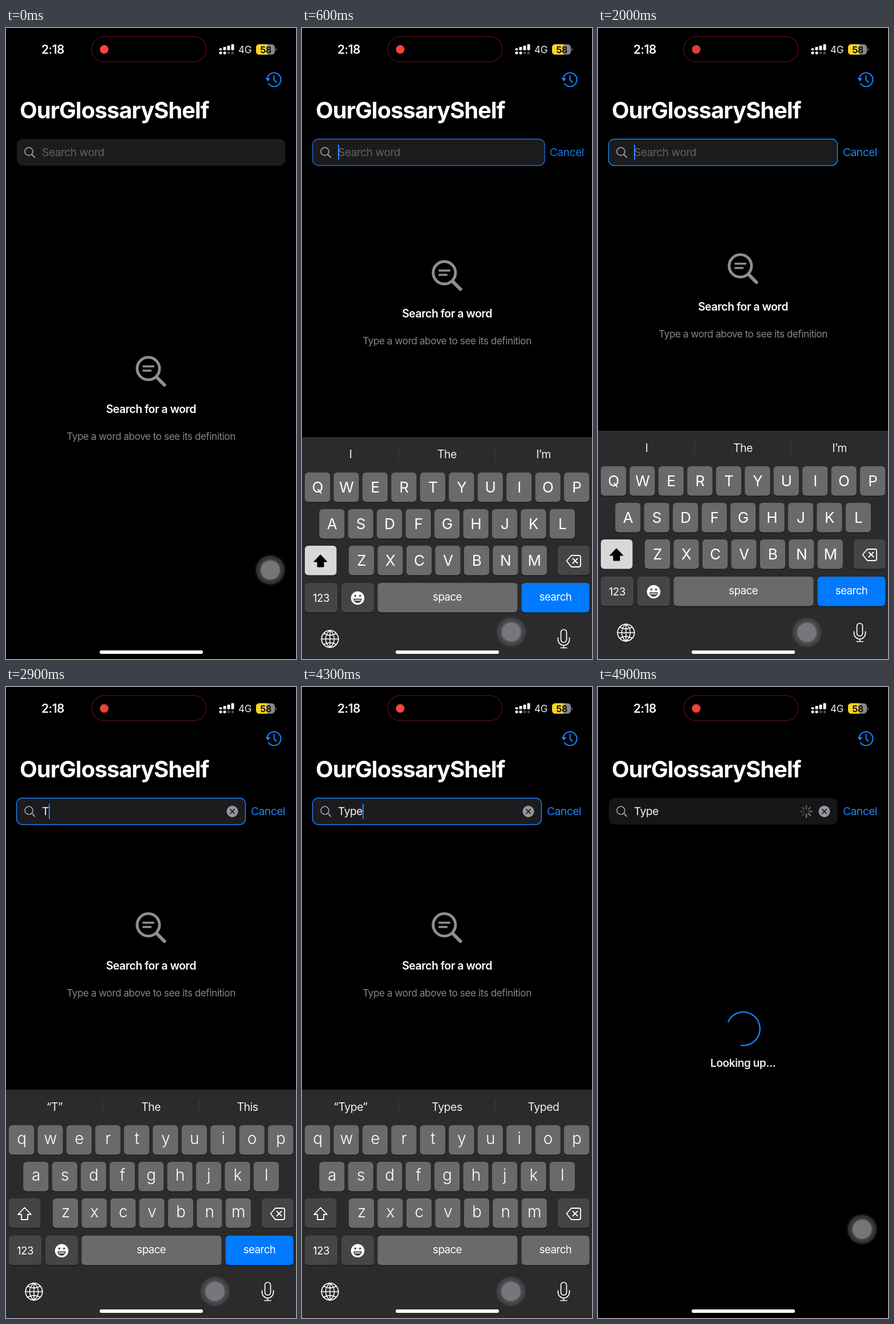
Write an HTML page with a canvas that moves like this. It is 508 px wide and 1103 px high and loops after 5 s.

```html
<!DOCTYPE html>
<html lang="en">
<head>
<meta charset="utf-8">
<title>Dictionary search</title>
<style>
  html, body { margin: 0; width: 100%; height: 100%; overflow: hidden; background: #000; }
  canvas { display: block; width: 508px; height: 1103px; }
</style>
</head>
<body>
<canvas id="stage" width="508" height="1103"></canvas>
<script>
const ctx = document.getElementById('stage').getContext('2d');
const LOOP = 5000, TAU = Math.PI * 2;
const BLUE = '#1a84ff', KEY = '#6a696c', DARK_KEY = '#454447', GREY = '#8e8e93';
const SUBMIT = 4380;

// Each key tap: when it is pressed, when its letter lands, when its popup goes
const TAPS = [
  { key: 't', down: 2500, typed: 2600, up: 2680 },
  { key: 'y', down: 3260, typed: 3380, up: 3440 },
  { key: 'p', down: 3450, typed: 3560, up: 3620 },
  { key: 'e', down: 3820, typed: 3900, up: 3980 }
];
const WORDS = ['', 'T', 'Ty', 'Typ', 'Type'];
const HINTS = [
  ['I', 'The', 'I’m'],
  ['“T”', 'The', 'This'],
  ['“Ty”', 'Type', 'Types'],
  ['“Typ”', 'Type', 'Types'],
  ['“Type”', 'Types', 'Typed']
];
const ROWS = [
  { keys: 'qwertyuiop', x: 5, y: 766 },
  { keys: 'asdfghjkl', x: 30.2, y: 830 },
  { keys: 'zxcvbnm', x: 82, y: 894 }
];

// Critically damped spring from 0 to 1
function spring(t, start, speed) {
  const x = Math.max(0, t - start) / 1000 * speed;
  return 1 - (1 + x) * Math.exp(-x);
}

function text(str, x, y, size, color = '#fff', weight = 400, align = 'center') {
  ctx.font = `${weight} ${size}px Inter, "Liberation Sans", sans-serif`;
  ctx.letterSpacing = `${-0.026 * size}px`;
  ctx.textAlign = align;
  ctx.fillStyle = color;
  ctx.fillText(str, x, y);
  return ctx.measureText(str).width;
}

function box(x, y, w, h, r, color) {
  ctx.beginPath();
  ctx.roundRect(x, y, w, h, r);
  ctx.fillStyle = color;
  ctx.fill();
}

function disc(x, y, r, color) {
  ctx.beginPath();
  ctx.arc(x, y, r, 0, TAU);
  ctx.fillStyle = color;
  ctx.fill();
}

function line(d, color, width) {
  ctx.strokeStyle = color;
  ctx.lineWidth = width;
  ctx.stroke(new Path2D(d));
}

function fill(d, color) {
  ctx.fillStyle = color;
  ctx.fill(new Path2D(d));
}

function ring(x, y, r, color, width, from = 0, to = TAU) {
  ctx.beginPath();
  ctx.arc(x, y, r, from, to);
  ctx.strokeStyle = color;
  ctx.lineWidth = width;
  ctx.stroke();
}

function shifted(x, y, draw) {
  ctx.save();
  ctx.translate(x, y);
  draw();
  ctx.restore();
}

function drawHeader(t) {
  text('2:18', 62, 45, 21, '#fff', 600, 'left');
  ctx.beginPath();
  ctx.roundRect(150, 15, 201, 44, 22);
  ctx.strokeStyle = '#4c0a1a';
  ctx.lineWidth = 1.6;
  ctx.stroke();
  ctx.globalAlpha = 0.94 + 0.06 * Math.cos(t / 4000 * TAU);
  disc(172, 37.5, 7.5, '#ff463c');
  ctx.globalAlpha = 1;

  for (let i = 0; i < 4; i++) {
    const h = 3.5 + i * 2.4;
    box(373.5 + i * 7, 39 - h, 5, h, 1.4, '#fff');
    disc(376 + i * 7, 43.4, 2.5, i < 2 ? '#fff' : '#4b4b4d');
  }
  text('4G', 418.5, 44, 17, '#f2f2f2');
  box(438, 28.5, 33, 18, 5.5, '#88878b');
  box(438, 28.5, 20, 18, [5.5, 0, 0, 5.5], '#fbd51f');
  fill('M472.3 35a3 3 0 0 1 0 5.5z', '#77767a');
  text('58', 455, 43.5, 16, '#141414', 700);

  ring(469.5, 90.3, 12, BLUE, 2, Math.PI, Math.PI * 2.8);
  fill('M454.5 87.5h8.5l-4.2 6z', BLUE);
  line('M469.5 83v7.5l4 4.5', BLUE, 2);
  text('OurGlossaryShelf', 24, 158, 40, '#fff', 700, 'left');
}

function drawField(t, word) {
  const open = spring(t, 269, 12.6);
  const focus = t < SUBMIT ? spring(t, 335, 12) : 1 - spring(t, SUBMIT, 18);
  const loading = t >= SUBMIT;
  const right = 489.5 - 70 * open;

  box(19, 194, right - 19, 46.5, 10, loading ? '#161618' : '#1c1b1e');
  ctx.globalAlpha = focus;
  ctx.beginPath();
  ctx.roundRect(18.5, 194.2, right - 18.5, 46.3, 10);
  ctx.strokeStyle = BLUE;
  ctx.lineWidth = 1.4;
  ctx.stroke();
  ctx.globalAlpha = 1;

  ring(40, 215.8, 7, '#a4a4a8', 1.6);
  line('M45.2 221l5 5', '#a4a4a8', 1.8);

  const width = text(word || 'Search word', 63, 224.3, 19.2, word ? '#f4f4f4' : '#626166', 400, 'left');
  if (word) {
    disc(396.5, 217.5, 10, '#98979c');
    line('M392.8 213.8l7.4 7.4m0-7.4l-7.4 7.4', '#1c1b1e', 1.8);
  }

  const typing = t > TAPS[0].down;
  const lit = t < 900 || typing || (t - 900) % 1000 < 500;
  if (t > 300 && !loading && lit) box(word ? 63 + width : 63, 204, 2, 27, 1, '#2f80ff');

  ctx.globalAlpha = open ** 1.5;
  text('Cancel', 429 + 61 * (1 - open), 224.3, 19.2, BLUE, 400, 'left');
  ctx.globalAlpha = 1;

  if (loading) {
    const step = Math.floor((t - SUBMIT) / 125);
    for (let i = 0; i < 8; i++) {
      const age = (step - i + 80) % 8;
      shifted(365, 217.5, () => {
        ctx.rotate(i * TAU / 8);
        ctx.globalAlpha = 0.75 - age * 0.07;
        line('M0-5V-10', '#98979c', 2.4);
      });
    }
  }
}

function drawEmpty() {
  ring(249.3, 595.3, 19.6, GREY, 4.8);
  line('M264 610.5L277.5 624', GREY, 6);
  line('M240.5 591.5h18M240.5 599h13', GREY, 3.4);
  text('Search for a word', 254, 673.3, 19.5, '#fff', 600);
  text('Type a word above to see its definition', 254, 720, 17.2, '#858489');
}

function drawLoading(t) {
  const start = (205 + (t - 4900) * 0.36) * TAU / 360;
  ring(254.5, 597.5, 29.2, BLUE, 2.4, start, start + TAU * 0.7);
  text('Looking up...', 254, 664.5, 19.2, '#ececec', 600);
}

function drawKey(x, y, w, color) {
  box(x, y + 1.5, w, 51.5, 6, '#19181a');
  box(x, y, w, 51.5, 6, color);
}

function drawPopup(letter, x, y) {
  const w = 44.5, right = x + w;
  const l = x < 10 ? x : x - 29 / (x > 450 ? 1 : 2);
  const r = x > 450 ? right : right + 29 / (x < 10 ? 1 : 2);
  const top = y - 73, bend = y - 16, neck = y + 12, bottom = y + 51;
  fill(`M${l + 9} ${top}H${r - 9}Q${r} ${top} ${r} ${top + 9}V${bend}
    C${r} ${bend + 14} ${right} ${neck - 14} ${right} ${neck}V${bottom - 6}
    Q${right} ${bottom} ${right - 6} ${bottom}H${x + 6}Q${x} ${bottom} ${x} ${bottom - 6}V${neck}
    C${x} ${neck - 14} ${l} ${bend + 14} ${l} ${bend}V${top + 9}Q${l} ${top} ${l + 9} ${top}z`, KEY);
  text(letter, (l + r) / 2, y - 24, 42, '#fff', 300);
}

function drawKeyboard(t, typed) {
  const upper = typed === 0;
  box(0, 704, 508, 399, 0, '#2b2a2d');
  line('M169 721v25M338 721v25', '#3f3e41', 1.2);
  const shown = TAPS.filter(tap => t >= tap.typed + 130).length;
  HINTS[shown].forEach((hint, i) => text(hint, 85 + i * 169, 740.5, 19.5, '#f2f2f2'));

  const tap = TAPS.find(p => t >= p.down && t < p.up);
  let popup;
  for (const row of ROWS) {
    [...row.keys].forEach((key, i) => {
      const x = row.x + i * 50.44;
      const label = upper ? key.toUpperCase() : key;
      if (tap && tap.key === key) {
        popup = () => drawPopup(label, x, row.y);
        return;
      }
      drawKey(x, row.y, 44.2, KEY);
      text(label, x + 22.2, row.y + (upper ? 34.5 : 33), upper ? 26 : 28, '#fff', upper ? 400 : 300);
    });
  }

  drawKey(5, 894, 55.5, upper ? '#d8d8d9' : DARK_KEY);
  const arrow = 'M32.5 910L44 922H38V931H27V922H21z';
  if (upper) fill(arrow, '#000');
  line(arrow, upper ? '#000' : '#fff', upper ? 1 : 1.8);

  drawKey(448, 894, 55.5, DARK_KEY);
  line('M463.5 920.5L471 912Q472 911 473.5 911H485Q488 911 488 914V928Q488 931 485 931H473.5Q472 931 471 930z', '#fff', 1.8);
  line('M474.5 916.5l8 8m0-8l-8 8', '#fff', 1.8);

  drawKey(5, 959, 57, DARK_KEY);
  text('123', 33.5, 991.5, 18.6);
  drawKey(69, 959, 57, DARK_KEY);
  disc(97.5, 985.5, 11.8, '#fff');
  disc(93.3, 981.5, 1.8, DARK_KEY);
  disc(101.7, 981.5, 1.8, DARK_KEY);
  fill('M90 986.5H105Q104 994 97.5 994T90 986.5z', DARK_KEY);
  line('M92.5 989.3h10', '#fff', 1.4);
  drawKey(132.5, 959, 245, KEY);
  text('space', 254.5, 990, 18.6);
  drawKey(384.5, 959, 119, t >= 4220 && t < SUBMIT ? KEY : '#007aff');
  text('search', 444, 990, 18.6);

  ring(49, 1057, 14.8, '#fff', 1.7);
  line('M49 1042v30M34 1057h30M38 1047.5q11 6 22 0M38 1066.5q11-6 22 0M49 1042c-10 8-10 22 0 30M49 1042c10 8 10 22 0 30', '#fff', 1.5);
  line('M453.5 1045.5a5 5 0 0 1 10 0v12.5a5 5 0 0 1-10 0zM448.5 1055v3a10 10 0 0 0 20 0v-3M458.5 1068v4.5M453 1072.5h11', '#fff', 1.7);
  if (popup) popup();
}

function drawTouch(t) {
  const k = spring(t, 90, 14) - spring(t, 4380, 15);
  shifted(463 - 97 * k, 947.5 + 109 * k, () => {
    disc(0, 0, 28, 'rgba(70,70,72,.18)');
    disc(0, 0, 25, 'rgba(88,88,91,.5)');
    disc(0, 0, 20, 'rgba(110,110,113,.3)');
    disc(0, 0, 16.8, '#767579');
  });
}

function draw(t) {
  const typed = TAPS.filter(tap => t >= tap.typed).length;
  ctx.fillStyle = '#000';
  ctx.fillRect(0, 0, 508, 1103);
  ctx.lineCap = ctx.lineJoin = 'round';
  drawHeader(t);
  drawField(t, WORDS[typed]);

  const lift = spring(t, 253, 12.6) - spring(t, SUBMIT, 19);
  shifted(0, -179.5 * lift, () => t < SUBMIT ? drawEmpty() : drawLoading(t));

  const raised = spring(t, 171, 12.6) - spring(t, SUBMIT, 18);
  if (raised > 0.008) shifted(0, Math.round(399 * (1 - raised)), () => drawKeyboard(t, typed));

  box(164, 1088, 181, 6, 3, '#fff');
  drawTouch(t);
}

function frame() {
  draw(performance.now() % LOOP);
  requestAnimationFrame(frame);
}
frame();
</script>
</body>
</html>
```
